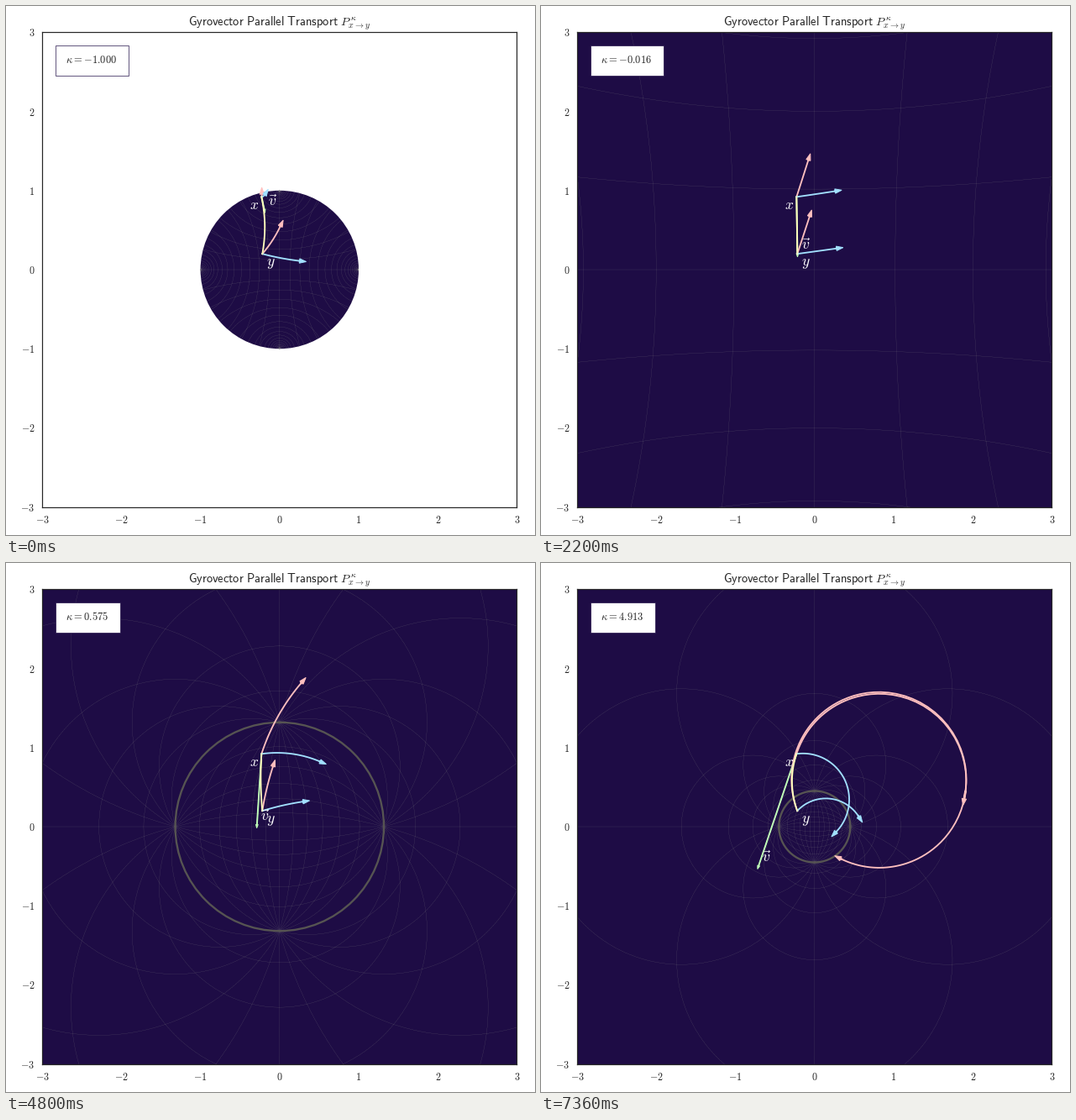
A matplotlib script for the animation above (7.4 s loop, 630x630 px).

```python
import numpy as np
import matplotlib.pyplot as plt
from matplotlib.animation import FuncAnimation
from matplotlib.patches import Circle, FancyArrow, Rectangle
from matplotlib.transforms import IdentityTransform

SIZE, DPI = 630, 70
INK, NIGHT = "0.15", "#1e0c45"
PINK, BLUE, YELLOW, GREEN = "#ffc0bf", "#a2e0ff", "#fffebb", "#c0ffb8"

# Curvatures: cubic spacing, skipping the nearly flat ones
KS = np.linspace(-1, 1.7, 200) ** 3
KS = KS[np.abs(KS) > 1e-3]

# Points of the plane are complex numbers
X, Y = -0.228 + 0.92j, -0.218 + 0.2j
DIRS = np.exp(1j * np.radians([72, 8]))
T = np.linspace(0, 1, 100)

plt.rcParams.update({"mathtext.fontset": "cm", "text.color": INK,
                     "xtick.color": INK, "ytick.color": INK,
                     "axes.edgecolor": INK, "axes.linewidth": 1.25})


def tan_k(s, k):
    q = np.sqrt(abs(k))
    return (np.tan if k > 0 else np.tanh)(q * s) / q


def atan_k(s, k):
    q = np.sqrt(abs(k))
    return (np.arctan if k > 0 else np.arctanh)(q * s) / q


def add(a, b, k):
    """Gyrovector addition."""
    return (a + b) / (1 - k * np.conj(a) * b)


def geodesic(p, u, k):
    """Unit-speed geodesic of length one."""
    return add(p, tan_k(T / 2, k) * u, k)


def grid(k):
    """All grid geodesics as one broken line."""
    R = 1 / np.sqrt(abs(k))
    reach = R if k < 0 else 4
    parts = [np.array([-reach, reach]), np.array([-reach, reach]) * 1j]
    if k < 0:
        for i in range(1, 46):
            r = R * np.tanh(i * np.pi / 24)
            rho = (R * R / r - r) / 2
            a = np.arctan(R / rho) * np.linspace(-1, 1, 300)
            arc = r + rho - rho * np.exp(1j * a)
            parts += [arc, -arc, 1j * arc, -1j * arc]
    else:
        a = np.linspace(0, 2 * np.pi, 1500)
        for i in range(1, 12):
            r = R * np.tan(i * np.pi / 24)
            ring = (r - R * R / r) / 2 + (r + R * R / r) / 2 * np.exp(1j * a)
            parts += [ring, 1j * ring]
    gap = np.array([complex(np.nan, np.nan)])
    return np.concatenate([p for part in parts for p in (part, gap)])


fig = plt.figure(figsize=(SIZE / DPI, SIZE / DPI), dpi=DPI, facecolor="white")
ax = fig.add_axes([43.2 / SIZE, 33.4 / SIZE, 565.2 / SIZE, 565.2 / SIZE])
ax.set(xlim=(-3, 3), ylim=(-3, 3))
marks = range(-3, 4)
names = [f"${m}$" for m in marks]
ax.set_xticks(marks, names)
ax.set_yticks(marks, names)
ax.tick_params(length=0, pad=9.2, labelsize=12.4)
ax.set_title(r"$\mathsf{Gyrovector\ Parallel\ Transport}\ P^{\,\kappa}_{x\to y}$",
             fontsize=14.8, pad=7.4)

disc = ax.add_patch(Circle((0, 0), 1, fc=NIGHT, ec="none", zorder=0.5))
mesh, = ax.plot([], [], "--", color="gray", lw=0.2, zorder=1)
rim = ax.add_patch(Circle((0, 0), 1, fill=False, ec="#565452", lw=2.4, zorder=1.5))


def curve(color):
    return ax.plot([], [], color=color, lw=1.9, zorder=4)[0]


def arrow(color, width):
    head = FancyArrow(0, 0, 1, 1, width=width, color=color, lw=1, zorder=3)
    return ax.add_patch(head)


def label(text, at):
    return ax.text(at.real, at.imag, text, color="white", fontsize=18, zorder=6)


chord = arrow(GREEN, 0.01)
vectors = [(p, j, curve(c), arrow(c, 0.019))
           for p in (X, Y) for j, c in enumerate((PINK, BLUE))]
path = curve(YELLOW)

label("$x$", X - 0.155 - 0.16j)
label("$y$", Y + 0.045 - 0.15j)
v_label = label(r"$\vec{v}$", X)

px = IdentityTransform()
box = ax.add_patch(Rectangle((59, 547), 87, 36, fc="white", ec=NIGHT, lw=0.7,
                             transform=px, zorder=7))
k_text = ax.text(71, 562, "", fontsize=12.9, transform=px, zorder=8)


def set_curve(line, z):
    line.set_data(z.real, z.imag)


def set_arrow(head, p, d):
    head.set_data(x=p.real, y=p.imag, dx=d.real, dy=d.imag)


def draw(n):
    k = KS[n]
    R = 1 / np.sqrt(abs(k))
    disc.set_radius(R if k < 0 else 9)
    rim.set_radius(R)
    rim.set_visible(k > 0)
    set_curve(mesh, grid(k))

    turn = (1 + k * Y * np.conj(X)) / (1 + k * np.conj(Y) * X)
    for p, j, line, head in vectors:
        z = geodesic(p, DIRS[j] * (turn if p == Y else 1), k)
        set_curve(line, z)
        set_arrow(head, z[-2], z[-1] - z[-2])

    w = add(-X, Y, k)
    u, half = w / abs(w), atan_k(abs(w), k)
    set_curve(path, add(X, tan_k(T * half, k) * u, k))
    v = (1 + k * abs(X) ** 2) * half * u
    set_arrow(chord, X, v)
    end = X + v + 0.045 + 0.05j
    v_label.set_position((end.real, end.imag))

    box.set_width(87 if k < 0 else 77)
    sign = "{-}" if k < 0 else ""
    k_text.set_text(rf"$\kappa={sign}{abs(k):.3f}$")


anim = FuncAnimation(fig, draw, frames=len(KS), interval=40, repeat=True)
plt.show()
```
